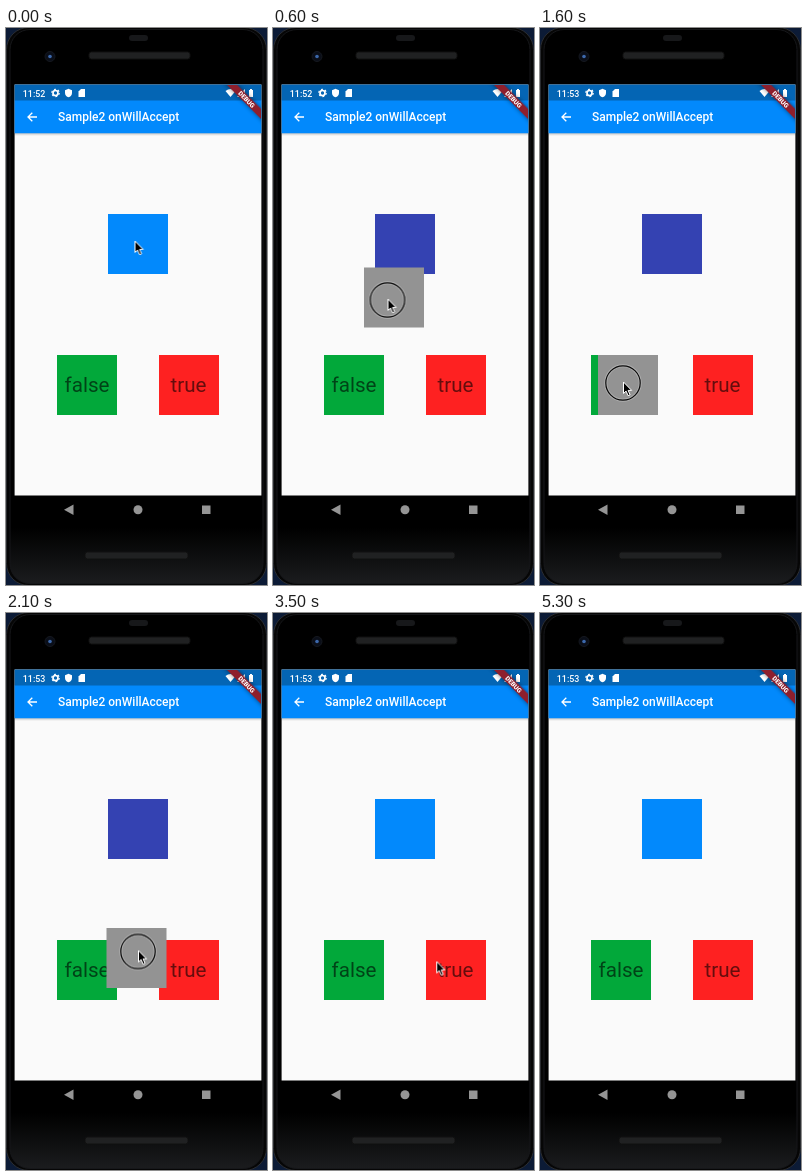
An HTML page for the animation above (5400 ms loop, 261 px wide and 557 px high).

```html
<!DOCTYPE html>
<html lang="en">
<head>
<meta charset="utf-8">
<title>Drag and drop demo</title>
<style>
  html, body { margin: 0; width: 100%; height: 100%; overflow: hidden; background: #0c1b36; }
  svg { display: block; width: 261px; height: 557px; }
  text { font-family: Roboto, sans-serif; }
  .label { font-size: 20.6px; fill: #000; fill-opacity: .6; text-anchor: middle; }
  .ribbon { filter: drop-shadow(0 0 2px rgba(0, 0, 0, .5)); }

  .show { animation: 5400ms step-end infinite; }
  .move { animation: 5400ms steps(2) infinite; }

  #held, #ring { animation-name: held; }
  #idle { animation-name: idle; }
  #accept { animation-name: accept; }
  #before { animation-name: before; }
  #after { animation-name: after; }
  #arrow { animation-name: arrow; }
  #pointer { animation-name: pointer; }
  #box { animation-name: box; }

  @keyframes held { 0%, 62.96%, 100% { opacity: 0 } 3.7% { opacity: 1 } }
  @keyframes idle { 0%, 62.96%, 100% { opacity: 1 } 3.7% { opacity: 0 } }
  @keyframes accept { 0%, 62.96%, 100% { opacity: 1 } 44.44% { opacity: 0 } }
  @keyframes before { 0%, 100% { opacity: 1 } 27.77% { opacity: 0 } }
  @keyframes after { 0%, 100% { opacity: 0 } 27.77% { opacity: 1 } }
  @keyframes arrow { 0%, 100% { opacity: 1 } 87.03% { opacity: 0 } }

  /* steps() counts one tick per 100 ms */
  @keyframes pointer {
    0%, 3.7% { transform: translate(128.5px, 213px) }
    5.55% { transform: translate(127.5px, 216px) }
    9.25% { transform: translate(121px, 240px) }
    12.96% { transform: translate(108px, 302px) }
    16.66% { transform: translate(99px, 339px); animation-timing-function: steps(4) }
    24.07%, 31.48% { transform: translate(83px, 354px); animation-timing-function: steps(4) }
    38.88% { transform: translate(132px, 337.5px); animation-timing-function: steps(4) }
    46.29% { transform: translate(160px, 349px) }
    50%, 62.96% { transform: translate(162.5px, 350px) }
    66.66%, 100% { transform: translate(164px, 347px) }
  }
  @keyframes box {
    0%, 3.7% { transform: translate(102px, 186px) }
    5.55% { transform: translate(102px, 187px) }
    9.25% { transform: translate(97px, 209px) }
    12.96% { transform: translate(85px, 270px) }
    16.66% { transform: translate(75px, 312px); animation-timing-function: steps(4) }
    24.07%, 31.48% { transform: translate(58px, 327px); animation-timing-function: steps(4) }
    38.88% { transform: translate(100.5px, 315px); animation-timing-function: steps(4) }
    46.29% { transform: translate(134px, 322px) }
    50%, 100% { transform: translate(137px, 324px) }
  }
</style>
</head>
<body>
<svg viewBox="0 0 261 557">
  <defs>
    <linearGradient id="shadow" x2="0" y2="1">
      <stop stop-color="#000" stop-opacity=".22"/>
      <stop offset="1" stop-color="#000" stop-opacity="0"/>
    </linearGradient>
    <linearGradient id="body" x2="0" y2="1">
      <stop offset=".9" stop-color="#000"/>
      <stop offset="1" stop-color="#1b1c1e"/>
    </linearGradient>
    <clipPath id="screen"><path d="M9 57h246v410H9z"/></clipPath>
  </defs>

  <!-- phone body -->
  <rect x=".5" y="-.5" width="260" height="558" rx="22" fill="#060606" stroke="#2a2c30"/>
  <rect x="4" y="1.500" width="253" height="554" rx="20" fill="url(#body)" stroke="#16171a"/>
  <rect x="123" y="7" width="19" height="6" rx="3" fill="#17181a"/>
  <rect x="83" y="24" width="101" height="7" rx="2.500" fill="#202122" stroke="#111"/>
  <rect x="79" y="524" width="103" height="7" rx="2.500" fill="#202122" stroke="#111"/>
  <circle cx="44" cy="28.500" r="5" fill="#0a0e18" stroke="#15181f"/>
  <circle cx="44" cy="28.500" r="1.800" fill="#3c68ab"/>

  <!-- app -->
  <path d="M8.600 56.600h246.800v410.800H8.600z" fill="#fafafa"/>
  <path d="M8.600 105h246.800v3H8.600z" fill="url(#shadow)"/>
  <path d="M8.600 72h246.800v33.200H8.600z" fill="#0289fc"/>
  <path d="M8.600 56.600h246.800v15.800H8.600z" fill="#0465b4"/>

  <g fill="#fff">
    <g font-size="8.9" font-weight="500">
      <text id="before" class="show" x="16.800" y="68.500">11:52</text>
      <text id="after" class="show" x="16.800" y="68.500">11:53</text>
    </g>
    <circle cx="49.500" cy="65" r="2.500" fill="none" stroke="#fff" stroke-width="1.700"/>
    <circle cx="49.500" cy="65" r="3.700" fill="none" stroke="#fff" stroke-width="1.200" stroke-dasharray="1.900 1.975"/>
    <path d="M62.500 60.700l3.500 1.500v2.800c0 2-1.500 3.700-3.500 4.300-2-.6-3.500-2.300-3.500-4.300v-2.800z"/>
    <path d="M75 61h4v8h-6.500v-5.500z"/>
    <path d="M219.500 63q5-4 10 0l-5 6z"/>
    <path d="M239 61v8h-8z"/>
    <path d="M243 62h1v-1h2v1h1v7h-4z"/>
    <path d="M31 89h-9m4.300-4.300L22 89l4.300 4.300" fill="none" stroke="#fff" stroke-width="1.300"/>
    <text x="52" y="93.300" font-size="12" font-weight="500">Sample2 onWillAccept</text>
  </g>

  <g clip-path="url(#screen)">
    <g transform="translate(255 57) rotate(45)">
      <path class="ribbon" d="M-40 16.800h80v7.200h-80z" fill="#8e1f2d"/>
      <text y="22.700" font-size="6.400" font-weight="900" text-anchor="middle" fill="#fff">DEBUG</text>
    </g>
  </g>

  <!-- drag source and targets -->
  <path d="M102 186h60v60h-60z" fill="#3442b2"/>
  <path id="idle" class="show" d="M102 186h60v60h-60z" fill="#0289fc"/>
  <path d="M51 327h60v60H51z" fill="#02a83a"/>
  <text class="label" x="81" y="364">false</text>
  <g id="accept" class="show">
    <path d="M153 327h60v60h-60z" fill="#fe2121"/>
    <text class="label" x="182.500" y="364">true</text>
  </g>

  <!-- navigation bar -->
  <g fill="#959595">
    <path d="M67.500 476.500v10.500l-9.500-5.250z"/>
    <circle cx="132" cy="481.700" r="4.500"/>
    <path d="M196 477.500h8.500v8.500H196z"/>
  </g>

  <!-- dragged box and pointer -->
  <g id="box" class="move">
    <path id="held" class="show" d="M0 0h60v60H0z" fill="#939393"/>
  </g>
  <g id="pointer" class="move">
    <g id="ring" class="show" fill="none">
      <circle cy="1" r="17.200" stroke="#ccc" stroke-opacity=".5" stroke-width="3"/>
      <circle cy="1" r="17.200" stroke="#0a0a0a" stroke-width="1.200"/>
    </g>
    <path id="arrow" class="show" d="M.5 0v11.500l2.600-2.400 2 4.600 2-.9-2-4.400h3.600z" fill="#000" stroke="#fff" stroke-width="1"/>
  </g>
</svg>
</body>
</html>
```
